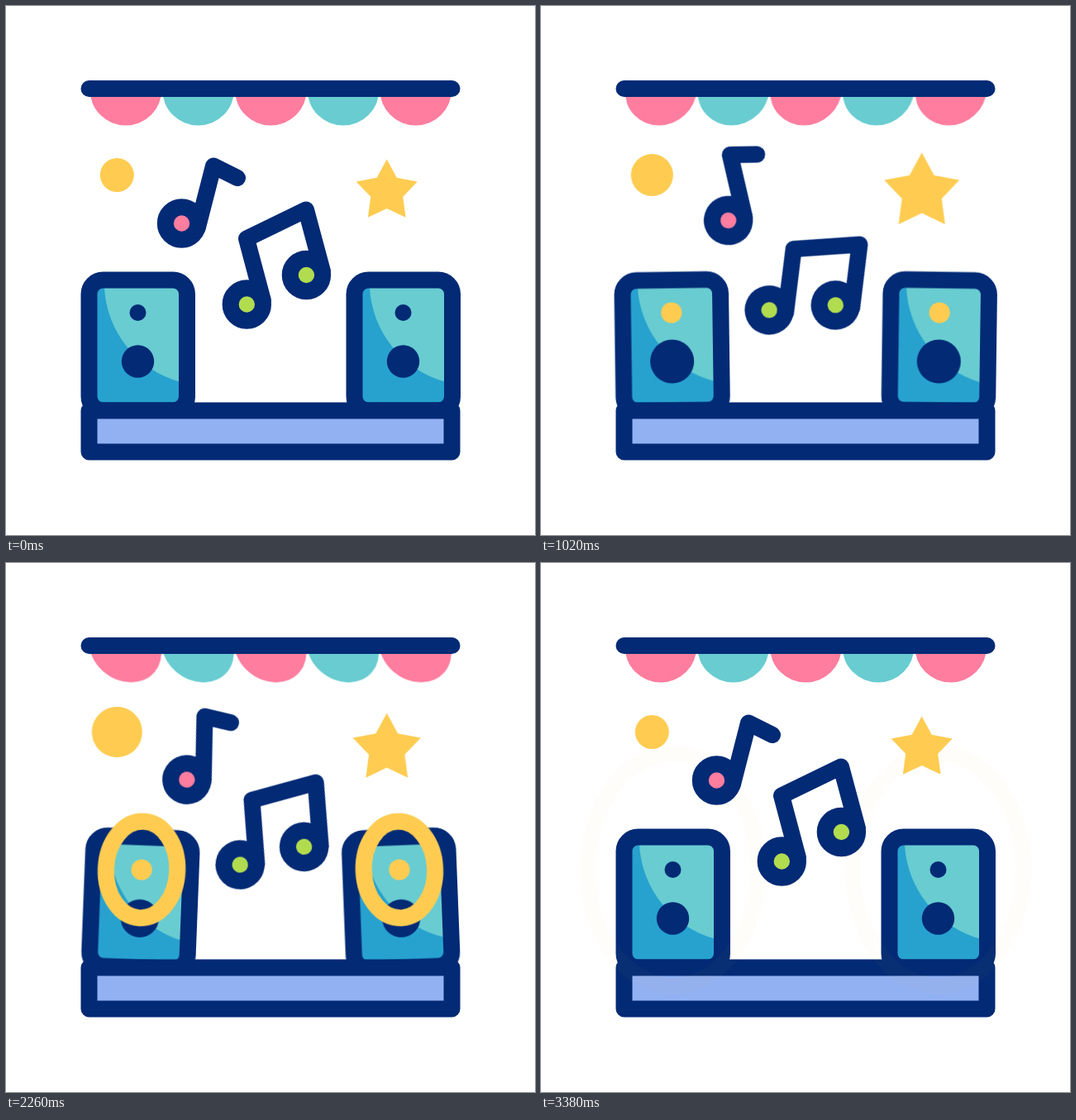
Animation, 640 px wide and 640 px high, one loop 3400 ms. Source, as an HTML page:

```html
<!DOCTYPE html>
<html lang="en">
<head>
<meta charset="utf-8">
<title>Music stage</title>
<style>
  html, body { margin: 0; width: 100%; height: 100%; overflow: hidden; background: #fff; }
  svg {
    display: block; width: 100vw; height: 100vh;
    --navy: #022a75; --pink: #ff7d9f; --teal: #68ccd1; --blue: #27a2ce;
    --yellow: #ffcc51; --green: #b2dc4f; --side: 1;
  }
  .navy { fill: var(--navy); }
  .pink { fill: var(--pink); }
  .teal { fill: var(--teal); }
  .blue { fill: var(--blue); }
  .yellow { fill: var(--yellow); }
  .green { fill: var(--green); }
  .line {
    stroke: var(--navy); stroke-width: 20;
    stroke-linecap: round; stroke-linejoin: round;
  }

  .sway, .flags, .note, .duo, .star, .ball, .woofer, .tweeter, .rings ellipse {
    animation: 3400ms cubic-bezier(.3333, 0, .6667, 1) infinite;
  }
  .sway { animation-name: sway; transform-origin: 159.5px 490px; }
  .flags { animation-name: flags; transform-origin: 0 107px; }
  .note { animation-name: note; transform-origin: 236px 238px; }
  .duo { animation-name: duo; transform-origin: 327.5px 313.5px; }
  .star { animation-name: pulse; --grow: 1.4; transform-origin: 460.7px 220.5px; }
  .ball { animation-name: pulse; --grow: 1.86; animation-delay: -3320ms; transform-origin: 134.3px 204.5px; }
  .woofer { animation-name: pulse; --grow: 1.6; transform-origin: 159.5px 430px; }
  .tweeter { animation-name: glow; }

  /* one ring per beat, each visible for 600 ms */
  .rings ellipse { animation-name: ring; fill: none; stroke: var(--yellow); stroke-width: 20; }
  .rings :nth-child(1) { animation-delay: -3000ms; }
  .rings :nth-child(2) { animation-delay: -2200ms; }
  .rings :nth-child(3) { animation-delay: -1400ms; }
  .rings :nth-child(4) { animation-delay: -600ms; }

  /* four beats of 800 ms, then a rest of 200 ms */
  @keyframes sway {
    0%, 94.118%, 100% { transform: rotate(0deg); }
    11.765%, 35.294%, 58.824%, 82.353% { transform: rotate(calc(var(--side) * -5deg)); }
    23.529%, 47.059%, 70.588% { transform: rotate(calc(var(--side) * 5deg)); }
  }
  @keyframes flags {
    0%, 94.118%, 100% { transform: skewX(0deg); }
    11.765%, 35.294%, 58.824%, 82.353% { transform: skewX(-22deg); }
    23.529%, 47.059%, 70.588% { transform: skewX(22deg); }
  }
  @keyframes note {
    0%, 23.529%, 47.059%, 70.588%, 94.118%, 100% { transform: translateY(0) rotate(0deg); }
    11.765%, 35.294%, 58.824%, 82.353% { transform: translateY(-20px) rotate(-47.5deg); }
  }
  @keyframes duo {
    0%, 23.529%, 47.059%, 70.588%, 94.118%, 100% { transform: translateY(0) rotate(0deg); }
    11.765%, 35.294%, 58.824%, 82.353% { transform: translateY(41.3px) rotate(38deg); }
  }
  @keyframes pulse {
    0%, 23.529%, 47.059%, 70.588%, 94.118%, 100% { transform: scale(1); }
    11.765%, 35.294%, 58.824%, 82.353% { transform: scale(var(--grow)); }
  }
  @keyframes glow {
    0%, 94.118%, 100% { r: 10px; fill: var(--navy); }
    11.765% { fill: var(--yellow); }
    17.647% { r: 12.6px; }
    82.353% { r: 12.6px; fill: var(--yellow); }
  }
  @keyframes ring {
    0% { rx: 2.5px; ry: 2.5px; opacity: 1; }
    11.765% { opacity: 1; }
    17.647%, 100% { rx: 103.5px; ry: 141.2px; opacity: 0; }
  }
</style>
</head>
<body>
<svg viewBox="0 0 640 640">
  <g class="flags">
    <path class="pink" d="M101.4 101a43.5 43.5 0 0 0 87 0zm175.4 0a43.5 43.5 0 0 0 87 0zm175.4 0a43.5 43.5 0 0 0 87 0z"/>
    <path class="teal" d="M189.1 101a43.5 43.5 0 0 0 87 0zm175.4 0a43.5 43.5 0 0 0 87 0z"/>
  </g>
  <path class="line" d="M100.5 100H539.5"/>

  <g class="pair">
    <g class="sway">
      <rect class="teal" x="100.5" y="331.5" width="118.5" height="158" rx="17"/>
      <path class="blue" d="M119 341A125 125 0 0 0 210 454.5V488H102V333H119z"/>
      <rect class="line" x="100.5" y="331.5" width="118.5" height="158" rx="17" fill="none"/>
      <circle class="woofer navy" cx="159.5" cy="430" r="19.7"/>
      <circle class="tweeter navy" cx="159.5" cy="371" r="10"/>
    </g>
  </g>

  <rect class="line" x="100.5" y="489.5" width="439" height="50" fill="#92b1f3"/>

  <g class="pair">
    <g class="sway rings">
      <ellipse cx="159.5" cy="371"/>
      <ellipse cx="159.5" cy="371"/>
      <ellipse cx="159.5" cy="371"/>
      <ellipse cx="159.5" cy="371"/>
    </g>
  </g>

  <circle class="ball yellow" cx="134.3" cy="204.5" r="20.5"/>
  <polygon class="star yellow"/>

  <g class="note">
    <path class="line" fill="none" d="M280 208L251 193.5L231.8 268.2"/>
    <circle class="line pink" cx="212.5" cy="263" r="19.7"/>
  </g>
  <g class="duo">
    <path class="line" fill="none" d="M310.8 355.8L291 281.5L363 246.5L382.8 320.3"/>
    <circle class="line green" cx="291.3" cy="361" r="19.7"/>
    <circle class="line green" cx="363.4" cy="325.5" r="19.7"/>
  </g>
</svg>
<script>
  // Right speaker: same drawing, opposite sway.
  for (const left of document.querySelectorAll('.pair')) {
    const right = left.cloneNode(true);
    right.setAttribute('transform', 'translate(321)');
    right.style.setProperty('--side', -1);
    left.after(right);
  }

  const points = Array.from({ length: 10 }, (_, i) => {
    const a = i * Math.PI / 5, r = i % 2 ? 20.5 : 38.9;
    return [460.7 + r * Math.sin(a), 224.4 - r * Math.cos(a)].map(v => v.toFixed(2)).join();
  });
  document.querySelector('.star').setAttribute('points', points.join(' '));
</script>
</body>
</html>
```
